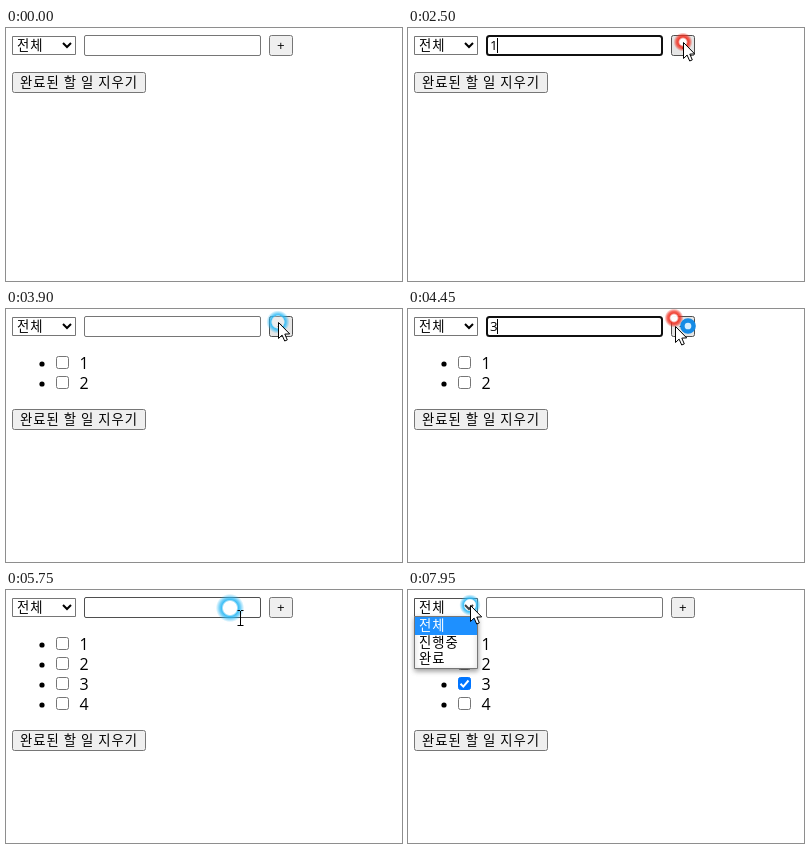
Write an HTML page with a canvas that moves like this. It is 396 px wide and 253 px high and loops after 8 s.

```html
<!DOCTYPE html>
<html lang="ko">
<head>
<meta charset="utf-8">
<title>할 일</title>
<style>
html, body { margin: 0; width: 100%; height: 100%; overflow: hidden; background: #fff; }
canvas { display: block; }
</style>
</head>
<body>
<canvas id="stage" width="396" height="253"></canvas>
<script>
const ctx = document.getElementById('stage').getContext('2d');
const LOOP = 8000, STEP = 50;
const HANGUL = '"Noto Sans CJK KR", "Noto Sans CJK", sans-serif';
const LATIN = '"Open Sans", "Noto Sans", sans-serif';
const GRAY = '#767676';

// pointer hotspot: time, x, y
const PATH = [
  [450, 106, 30], [650, 262, 39], [850, 262, 39], [1250, 92, 14], [1650, 164, 10],
  [2050, 164, 10], [2450, 275, 14], [2650, 275, 14], [3200, 229, 9], [3450, 229, 9],
  [3750, 272, 13], [3900, 272, 13], [4150, 225, 12], [4250, 225, 12], [4400, 266, 9],
  [4550, 266, 9], [4800, 228, 12], [5050, 228, 12], [5350, 268, 14], [5500, 268, 14],
  [5750, 224, 18], [5900, 250, 26], [6400, 29, 136], [6700, 66, 118], [7000, 58, 92],
  [7200, 58, 92], [7600, 62, 21], [7750, 62, 15]
];
const PRESSES = [1700, 2500, 3150, 3800, 4150, 4400, 4850, 5400, 7100, 7750];
// each round: focus, typed, added
const ROUNDS = [[1750, 2050, 2600], [3250, 3450, 3850], [4200, 4300, 4500], [4900, 5100, 5450]];
const CHECKED_AT = 7150, OPEN_AT = 7800;

const ease = p => p * p * (3 - 2 * p);

function pointerAt(t) {
  const i = PATH.findIndex(k => k[0] > t);
  if (i === 0) return null;
  if (i < 0) return { x: PATH[PATH.length - 1][1], y: PATH[PATH.length - 1][2] };
  const [t0, x0, y0] = PATH[i - 1], [t1, x1, y1] = PATH[i];
  const p = ease((t - t0) / (t1 - t0));
  return { x: x0 + (x1 - x0) * p, y: y0 + (y1 - y0) * p };
}

const inside = (p, x, y, w, h) => p && p.x >= x && p.x < x + w && p.y >= y && p.y < y + h;

function box(x, y, w, h, r, fill, stroke, line = 1) {
  const d = line / 2;
  ctx.beginPath();
  ctx.roundRect(x + d, y + d, w - line, h - line, r);
  ctx.fillStyle = fill;
  ctx.fill();
  if (!stroke) return;
  ctx.strokeStyle = stroke;
  ctx.lineWidth = line;
  ctx.stroke();
}

function text(str, x, y, size = 13.33, family = HANGUL, color = '#000', spacing = 0) {
  ctx.font = `${size}px ${family}`;
  ctx.letterSpacing = spacing + 'px';
  ctx.fillStyle = color;
  ctx.fillText(str, x, y);
}

const korean = (str, x, y, color) => text(str, x, y, 13.33, HANGUL, color, 1);

function line(points, color, width) {
  ctx.beginPath();
  points.forEach(([x, y]) => ctx.lineTo(x, y));
  ctx.strokeStyle = color;
  ctx.lineWidth = width;
  ctx.stroke();
}

function shadowed(blur, alpha, dy, draw) {
  ctx.save();
  ctx.shadowColor = `rgba(0,0,0,${alpha})`;
  ctx.shadowBlur = blur;
  ctx.shadowOffsetY = dy;
  draw();
  ctx.restore();
}

function button(x, y, w, hover) {
  box(x, y, w, 21, 2, hover ? '#e5e5e5' : '#efefef', hover ? '#4f4f4f' : GRAY);
}

function drawSelect(p) {
  box(6, 8, 64, 19, 0, '#fff', inside(p, 6, 8, 64, 19) ? '#4f4f4f' : GRAY);
  korean('전체', 11, 22);
  line([[57, 15], [61, 19], [65, 15]], '#000', 2);
}

function drawInput(p, focused, value, caret) {
  if (focused) box(78, 7, 177, 21, 2.5, '#fff', '#101010', 2);
  else box(78, 7, 177, 21, 1.5, '#fff', inside(p, 78, 7, 177, 21) ? '#4f4f4f' : GRAY);
  if (value) text(value, 82, 22, 13.33, LATIN);
  if (caret) {
    ctx.fillStyle = '#000';
    ctx.fillRect(value ? 89 : 82, 10, 1, 15);
  }
}

function drawItem(n, done, p) {
  const y = 27 + 20 * n;
  ctx.beginPath();
  ctx.arc(36, y + 8, 2.6, 0, 7);
  ctx.fillStyle = '#000';
  ctx.fill();
  if (done) {
    box(50, y, 13, 13, 2, '#0075ff', '#0075ff');
    line([[52.5, y + 6.8], [55.3, y + 9.6], [60.5, y + 3.5]], '#fff', 2);
  } else {
    box(50, y, 13, 13, 2, '#fff', inside(p, 50, y, 13, 13) ? '#4f4f4f' : GRAY);
  }
  text(String(n), 73.5, y + 13, 16, LATIN);
}

function drawHints() {
  shadowed(4, 0.4, 1, () => box(78, 29, 192, 88, 3, '#fff'));
  text('ㄴㅇㄹㄴㅇㄹ', 90, 60, 13.33);
  text('sdfsdf', 90, 96, 13, LATIN, '#222');
}

function drawOptions() {
  shadowed(5, 0.4, 2, () => box(6, 26, 64, 53, 0, '#fff', GRAY));
  ctx.fillStyle = '#1e90ff';
  ctx.fillRect(7, 27, 62, 18);
  korean('전체', 11, 40, '#fff');
  korean('진행중', 11, 57);
  korean('완료', 11, 73);
}

function drawRing(p, t, pressed, arrow) {
  const rgb = pressed ? '240,45,30' : '45,185,245';
  const r = pressed ? 9.5 : 12 + 3 * Math.cos((t / 1000 - 0.63) * 2 * Math.PI);
  const core = !pressed && arrow ? 0.25 : 0.95;
  const g = ctx.createRadialGradient(p.x, p.y, 0, p.x, p.y, r);
  g.addColorStop(0, `rgba(255,255,255,${core})`);
  g.addColorStop(pressed ? 0.33 : 0.46, `rgba(255,255,255,${core})`);
  g.addColorStop(pressed ? 0.52 : 0.6, `rgba(${rgb},0.9)`);
  g.addColorStop(0.72, `rgba(${rgb},0.7)`);
  g.addColorStop(1, `rgba(${rgb},0)`);
  ctx.fillStyle = g;
  ctx.beginPath();
  ctx.arc(p.x, p.y, r, 0, 7);
  ctx.fill();
}

function drawBeam(x, y) {
  x = Math.round(x) + 0.5;
  y = Math.round(y);
  line([[x, y - 7], [x, y + 8]], '#000', 1);
  for (const d of [-7.5, 7.5]) {
    line([[x - 3, y + d], [x - 0.5, y + d]], '#000', 1);
    line([[x + 0.5, y + d], [x + 3, y + d]], '#000', 1);
  }
}

function drawArrow(x, y) {
  ctx.save();
  ctx.translate(Math.round(x) + 0.5, Math.round(y) + 0.5);
  ctx.beginPath();
  [[0, 0], [0, 16], [3.6, 12.6], [6.2, 18.5], [8.8, 17.4], [6.3, 11.6], [11.2, 11.4]]
    .forEach(q => ctx.lineTo(...q));
  ctx.closePath();
  ctx.fillStyle = '#fff';
  ctx.fill();
  ctx.strokeStyle = '#000';
  ctx.lineWidth = 1;
  ctx.stroke();
  ctx.restore();
}

function drawBusy(x, y) {
  ctx.beginPath();
  ctx.arc(x, y, 5.6, 0, 7);
  ctx.fillStyle = '#d5edff';
  ctx.fill();
  ctx.strokeStyle = '#168be5';
  ctx.lineWidth = 4.5;
  ctx.stroke();
}

function drawPointer(p, t) {
  const pressed = PRESSES.some(s => t >= s && t < s + 100);
  const beam = inside(p, 78, 7, 177, 21);
  const busy = t >= 4400 && t < 4550;
  drawRing(p, t, pressed, !beam);
  if (beam) drawBeam(p.x + 10, p.y + 10);
  else if (busy) {
    drawArrow(p.x + 1, p.y + 8);
    drawBusy(p.x + 14, p.y + 8);
  } else drawArrow(p.x, p.y);
}

function draw(t) {
  const p = pointerAt(t);
  const count = ROUNDS.filter(r => t >= r[2]).length;
  const round = ROUNDS.findIndex(r => t >= r[0] && t < r[2]);
  const focused = round >= 0;
  const typed = focused && t >= ROUNDS[round][1];
  const clearY = count ? 60 + 20 * count : 44;

  ctx.fillStyle = '#fff';
  ctx.fillRect(0, 0, 396, 253);
  drawSelect(p);
  drawInput(p, focused, typed ? String(round + 1) : '', focused);
  button(263, 7, 24, inside(p, 263, 7, 24, 21));
  text('+', 271, 22, 13.33, LATIN);
  for (let n = 1; n <= count; n++) drawItem(n, n === 3 && t >= CHECKED_AT, p);
  button(6, clearY, 134, inside(p, 6, clearY, 134, 21));
  korean('완료된 할 일 지우기', 14, clearY + 15);
  if (focused && !typed) drawHints();
  if (t >= OPEN_AT) drawOptions();
  if (p) drawPointer(p, t);
}

function tick(now) {
  draw(Math.floor((now % LOOP) / STEP) * STEP);
  requestAnimationFrame(tick);
}
requestAnimationFrame(tick);
</script>
</body>
</html>
```
